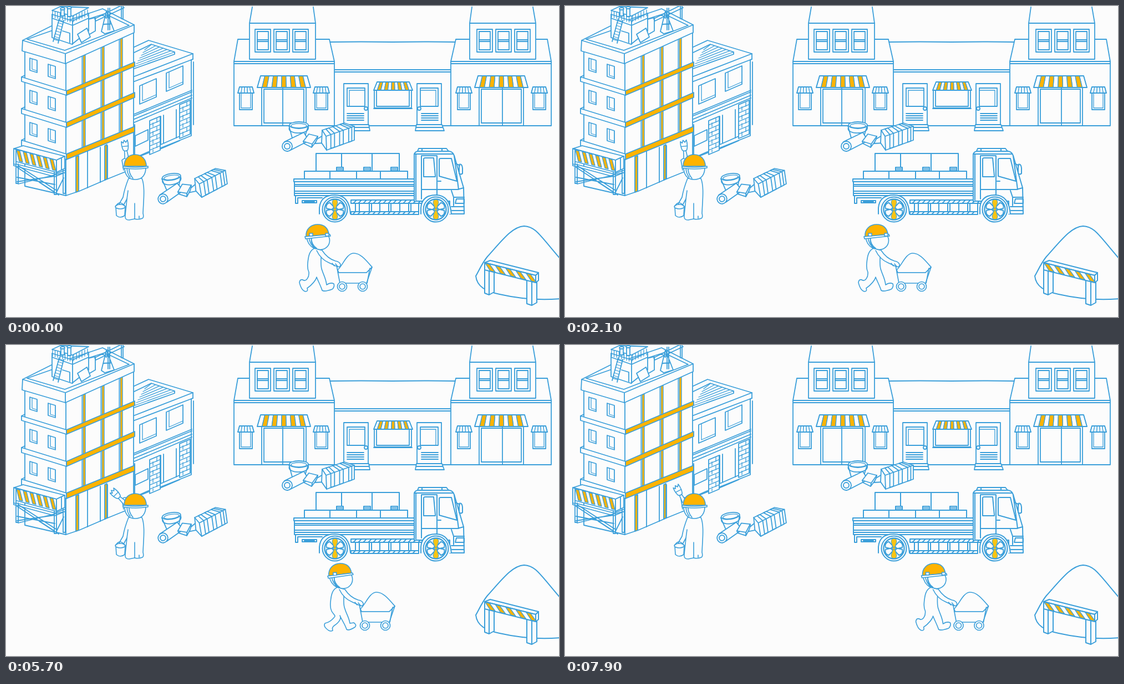
Write an HTML page that moves like this. It is 997 px wide and 561 px high and loops after 8000 ms.

```html
<!DOCTYPE html>
<html lang="en">
<head>
<meta charset="utf-8">
<title>Building site</title>
<style>
html, body { margin: 0; width: 100%; height: 100%; overflow: hidden; background: #fcfcfc; }
svg { display: block; width: 997px; height: 561px; }
svg * { vector-effect: non-scaling-stroke; }
#stage { fill: #fcfcfc; stroke: #3b9fda; stroke-width: 1.8; stroke-linejoin: round; stroke-linecap: round; }
#walker, #painter { stroke-width: 1.6; }
#truck, #sand { stroke-width: 2; }
.n { fill: none; }
.o { fill: #ffb300; }
.y { fill: #f8c414; stroke-width: 1; }
.b { stroke-width: 2.3; }
.t { stroke-width: 1.3; }
</style>
</head>
<body>
<svg viewBox="0 0 997 561"><g id="stage"></g></svg>
<script>
const path = (d, cls = '') => `<path class="${cls}" d="${d}"/>`;
const rect = (x, y, x2, y2, cls = '') => path(`M${x} ${y}H${x2}V${y2}H${x}Z`, cls);
const disc = (x, y, r, cls = '') => `<circle cx="${x}" cy="${y}" r="${r}" class="${cls}"/>`;
const oval = (x, y, rx, ry, cls = '') => `<ellipse cx="${x}" cy="${y}" rx="${rx}" ry="${ry}" class="${cls}"/>`;
const group = (body, transform = '', id = '') =>
  `<g${id && ` id="${id}"`}${transform && ` transform="${transform}"`}>${body}</g>`;
const repeat = (n, f) => Array.from({ length: n }, (_, i) => f(i)).join('');
const mix = (a, b, k) => a + (b - a) * k;

// Slanted four-sided panel: vertical edges at x and x2
const slant = (x, y, x2, y2, h, cls) => path(`M${x} ${y}L${x2} ${y2}v${h}L${x} ${y + h}Z`, cls);

function tower() {
  const bands = [[153, 101, 8], [210, 156, 9], [267, 217, 10]];
  const columns = [139, 173, 206].map(x => {
    const top = 104 - .455 * (x - 108), end = 267 - .4 * (x - 108);
    return path(`M${x - 2} ${top}V${end}`, 'n t') + slant(x, top, x + 4, top - 2, end - top, 'o t');
  }).join('');
  const floors = bands.map(([y, y2, h], i) =>
    slant(43, 94 + 58 * i, 56, 98 + 58 * i, 22) + path(`M47 ${96 + 58 * i}v18l9 3`, 'n t') +
    slant(76, 105 + 58 * i, 89, 109 + 58 * i, 22) + path(`M80 ${107 + 58 * i}v18l9 3`, 'n t') +
    slant(28, y - 25, 109, y, h) + path(`M28 ${y - 25}l6 -3`, 'n') +
    slant(109, y, 232, y2, h, 'o')).join('');
  return path('M34 80V325L108 342L132 334L183 312L230 293V40L108 95Z') +
    path('M108 95V342M183 252V312M147 262V328M170 255V318', 'n') +
    columns + floors +
    slant(126, 272, 131, 270, 64, 'o') + slant(178, 252, 182, 250, 62, 'o') +
    path('M30 62L82 36L174 5L231 34V48L107 104L29 81Z') +
    path('M30 62L107 86L231 34M107 86V104M38 60L106 80L222 35L178 14L84 44Z', 'n');
}

function rooftop() {
  return path('M83 15L120 27L149 13V45L119 69L83 57Z') +
    path('M120 27V69M83 22L120 35L149 22M102 45L115 49V66M149 24L161 21V45L149 52', 'n') +
    path('M83 8L98 1L149 3L120 18Z', 'n') +
    repeat(9, i => path(`M${84 + 4.5 * i} ${8 + 1.3 * i}v12`, 'n t')) +
    repeat(6, i => path(`M${122 + 5 * i} ${17 - 2 * i}v11`, 'n t')) +
    rect(99, 5, 105, 18) + rect(111, 2, 117, 19) + oval(102, 5, 4, 2) + oval(114, 3, 4, 2) +
    path('M85 64L96 23M94 67L104 26', 'n') +
    repeat(8, i => path(`M${86 + 1.3 * i} ${60 - 5 * i}l9 3`, 'n t')) +
    path('M129 51L146 40L152 56L136 66Z') +
    path('M172 46L181 9L195 45M176 33L190 32M172 46L178 50L195 45M184 4V43M187 4V43M160 23L206 0M162 27L213 3M160 23L162 27M174 16L181 22L188 13', 'n') +
    path('M208 0V23M211 0V24', 'n');
}

function annex() {
  const bricks = (x, y) => slant(x, y, x + 19, y - 8, 61) + repeat(8, i =>
    path(`M${x} ${y + 7.6 * i}l19 -8M${x + (i % 2 ? 6 : 13)} ${y + 7.6 * i - 4}v7`, 'n t'));
  return path('M229 75L257 62L337 86V96L334 97V234L229 276Z') +
    path('M229 128L337 86M229 137L337 96', 'n') +
    repeat(7, i => path(`M${232 + 3 * i} ${109 - 5 * i}L${304 - 7 * i} ${83 - 2.2 * i}`, 'n t')) +
    path('M231 113L304 87V83L262 69L231 84', 'n') +
    slant(241, 144, 271, 131, 33) + path('M246 142V171L271 160', 'n t') +
    slant(289, 121, 319, 108, 33) + path('M294 119V148L319 137', 'n t') +
    path('M229 196L335 152M229 199L335 155M229 205L335 161M229 211L335 166M232 214V270', 'n') +
    slant(233, 234, 256, 223, 19) +
    path('M279 199V250L313 235M284 197V247M307 187V238M232 274L259 262M278 258L313 243', 'n') +
    bricks(259, 207) + bricks(313, 178) + path('M338 101V214', 'n');
}

function scaffold() {
  return path('M18 284V320H22V285M87 300V340H91V300M103 296V338H107V293M14 284L88 303L107 296V300L88 308L14 288Z') +
    path('M20 291L88 336M22 288L90 332M20 317L87 307M22 321L103 301M91 336L104 310M20 309L88 322M60 318L95 341', 'n') +
    path('M15 257L31 252L106 271L91 278Z') +
    slant(16, 258, 91, 278, 22) +
    repeat(6, i => path(`M${19 + 12 * i} ${260 + 3.1 * i}l6 1.6l5 20l-6 -1.6Z`, 'o t')) +
    path('M91 278L106 271V293L91 300ZM100 274V296M14 257V285L18 286V259Z');
}

function awning(x, x2, y, bottom, inset, n, tinted) {
  const at = (k, pad) => mix(x + pad, x2 - pad, k);
  return repeat(n, i => {
    const a = i / n, b = (i + 1) / n;
    return path(`M${at(a, inset)} ${y}H${at(b, inset)}L${at(b, 0)} ${bottom}H${at(a, 0)}Z`, tinted && i % 2 ? 'o t' : 't');
  }) + path(`M${x + inset} ${y}H${x2 - inset}L${x2} ${bottom}H${x}Z`, 'n');
}

function halfStreet() {
  const sash = x => rect(x, 42, x + 28, 83) + rect(x + 4, 46, x + 24, 79) +
    path(`M${x + 4} 61h20M${x + 4} 64h20`, 'n');
  const sideWindow = x => rect(x + 3, 157, x + 26, 187) + rect(x + 6, 157, x + 23, 184, 't') +
    awning(x, x + 29, 146, 157, 3, 5);
  return path('M583 65Q640 64 697 65M592 115H697M592 119H697M592 216H697', 'n') +
    path('M418 60H583L592 100V216H411V100Z') + path('M411 100H592M411 104H592', 'n') +
    path('M444 2L439 31V96H558V31L554 2') + path('M440 31H558', 'n') +
    sash(449) + sash(483) + sash(517) +
    rect(461, 147, 541, 216) + path('M465 211V150H537V211M499 147V216M465 211H537', 'n') +
    awning(453, 549, 126, 147, 6, 11, true) + sideWindow(418) + sideWindow(554) +
    rect(609, 140, 653, 214) + rect(615, 148, 647, 181) + path('M619 181V152H647', 'n t') +
    disc(649, 185, 3) +
    repeat(4, i => path(`M615 ${194 + 4 * i}H645`, 'n')) +
    path('M608 214H654L656 225H604Z') + path('M607 219H655', 'n');
}

function street() {
  return group(halfStreet()) + group(halfStreet(), 'matrix(-1 0 0 1 1394 0)') +
    rect(664, 150, 731, 184) + path('M668 152V181H727V152M663 185H732', 'n') +
    awning(663, 733, 137, 152, 6, 11, true);
}

function supplies() {
  const strap = (k, k2) => path([k, k2].map((q, i) =>
    `${i ? 'L' : 'M'}${mix(571, 590, i)} ${mix(0, 0, i)}`).length &&
    `M${mix(570, 590, 0) + 40 * k} ${224 - 13 * k}L${577 + 51 * k} ${235 - 18 * k}V${260 - 18 * k}` +
    `L${577 + 51 * k2} ${260 - 18 * k2}V${235 - 18 * k2}L${570 + 40 * k2} ${224 - 13 * k2}Z`);
  return path('M510 216L516 238Q526 246 538 238L545 216') + oval(528, 215, 17, 6) + oval(528, 216, 14, 4, 't') +
    path('M511 219C508 226 519 230 530 229S546 224 545 218', 'n') +
    path('M502 245L537 228L546 243L513 260Z') + disc(507, 253, 9) + disc(507, 253, 5) +
    path('M536 244L546 231L562 235L552 249Z') + path('M536 244L537 248L551 255L552 249M562 235L561 242L551 255', 'n') +
    path('M561 240L574 232L575 247L557 248Z') +
    path('M570 224L610 211L628 217V242L578 260L569 247Z') +
    strap(.17, .3) + strap(.48, .61) + strap(.8, .91) +
    path('M570 224L577 235L628 217M577 235L578 260', 'n');
}

function wheel(x) {
  const spoke = a => group(path('M-3 -4L-6 -14Q0 -20 6 -14L3 -4Z', 'n'), `rotate(${a})`);
  const petal = path('M-1.5 -1L-5 -12Q-5 -18 0 -18Q5 -18 5 -12L1.5 -1Z', 'y');
  return group(disc(0, 0, 22.5) + disc(0, 0, 18.5, 'b') +
    [60, 120, 240, 300].map(spoke).join('') +
    petal + group(petal, 'rotate(180)') + disc(0, 0, 2.5, 'y'), `translate(${x} 367)`);
}

function truck() {
  const row = (xs, y, y2) => xs.slice(1).map((x, i) => rect(xs[i], y, x, y2)).join('');
  return row([559, 605, 660, 709], 266, 298) + row([538, 584, 632, 675, 724], 298, 312) +
    [596, 645, 694].map(x => rect(x, 291, x + 12, 297) + path(`M${x + 2} 294h8`, 'n')).join('') +
    rect(519, 312, 737, 317) + rect(520, 317, 737, 342) +
    path('M520 322H737M520 325H737M520 334H737M520 338H737', 'n') +
    path('M522 342V356H526V346H570M534 351H560V355H534ZM538 353H556', 'n') +
    path('M565 375V364Q567 341 593 341Q619 341 621 375') +
    rect(622, 350, 750, 356) + repeat(14, i => path(`M${626 + 9 * i} 356l6 -6`, 'n')) +
    rect(630, 356, 744, 371) +
    [637, 655, 659, 674, 690, 694, 710, 726, 730].map(x => path(`M${x} 356V371`, 'n')).join('') +
    rect(622, 371, 744, 376) + repeat(13, i => path(`M${625 + 9 * i} 376l5 -5`, 'n')) +
    path('M736 353V268Q737 262 744 262H799Q806 263 808 270L825 328L826 375H800V352H740Z') +
    path('M742 262L744 257H794L798 262ZM750 257V262M786 257V262') +
    path('M736 267H806M739 268V350M749 270V348M777 270V345M749 331H814L825 328M749 270H777M808 270L812 300L816 331', 'n') +
    path('M753 276Q753 274 756 274H771L774 306V308H753Z') +
    path('M781 277Q781 275 784 275H803L813 316L781 307Z') +
    path('M779 316h5M803 333L807 345H826M807 346V360M812 348H826V356H810ZM803 362H826M804 369H826', 'n') +
    path('M817 286Q822 284 823 292V302Q820 305 817 302ZM811 284L818 288') +
    path('M748 375V364Q750 341 775 341Q800 341 803 375') +
    wheel(593) + wheel(775);
}

function painter() {
  const brush = group(path('M-3 21L-2 5H2L4 21') + path('M-4 6Q-7 -1 -6 -10L-3 -7L-1 -12L2 -8L5 -12Q7 -2 4 6Q0 9 -4 6Z') +
    path('M-5 -1H5', 'n t'), '', 'brush');
  return path('M212 296L209 278Q215 272 219 278L226 294') + brush +
    path('M221 311C217 321 213 333 211 345L204 357L211 361L218 348C217 360 215 374 215 379Q214 386 222 386L232 384Q238 386 246 383Q249 381 247 374C248 350 251 325 245 311Z') +
    path('M218 348L220 333M232 384V356M240 383V379', 'n') +
    path('M198 362L199 378Q206 384 214 378L215 362Z') + oval(206, 362, 9, 4) + path('M198 361Q205 349 214 361', 'n') +
    path('M214 288C213 304 220 313 233 313S253 304 252 288Z') +
    path('M218 291Q218 302 224 309M222 291Q221 302 229 311', 'n') +
    path('M213 289C213 276 221 268 233 268S253 277 253 289Z', 'o') + path('M211 289Q233 293 256 289V292Q233 296 211 292Z');
}

function cart() {
  return path('M598 476C607 468 614 447 626 446C638 445 648 457 660 471L650 481H600Z') +
    path('M590 461L596 468L602 500H650L660 471L650 481H598') + path('M656 473L651 500', 'n') +
    disc(606, 506, 8.5) + disc(606, 506, 5) + disc(643, 506, 8.5) + disc(643, 506, 5);
}

// The legs continue the outline of the back down to the hip
function pusher(legs, tilt, ears) {
  const head = disc(567, 423, 16.5) + path('M542 416Q543 430 555 437M546 416Q547 430 558 438M550 416Q550 430 560 437', 'n') +
    path('M541 416C540 402 550 394 562 394S581 401 582 412Z', 'o') +
    path('M539 416L584 412L585 415L540 420Z') +
    ears.map(x => rect(x, 410, x + 6, 415)).join('');
  return path(`M557 437C547 440 545 452 544 464Q543 474 546 480${legs}C567 470 568 462 568 454L570 441Z`) +
    path('M560 441C565 452 574 460 582 463L597 470Q604 472 603 466Q601 461 594 460C584 457 576 450 570 441') +
    path('M588 464L592 469M594 465L598 470', 'n') +
    group(head, `rotate(${tilt} 562 418)`);
}

function sand() {
  return path('M1000 457C962 413 955 398 934 397C913 398 895 422 868 452C858 464 852 479 847 487C849 506 865 515 890 520C925 528 965 531 1000 528') +
    path('M863 474V518L871 521L880 516V478ZM871 479V521') + path('M939 492V537L948 540L957 535V494ZM948 496V540') +
    path('M863 463L873 459L960 481L955 486Z') + path('M955 486L960 481V495L955 499Z') + slant(863, 463, 955, 486, 13) +
    repeat(5, i => path(`M${864 + 18.5 * i} ${464 + 4.6 * i}l8 2l10 14l-9 -2.2Z`, 'o t'));
}

const strideWide = 'C547 490 541 496 537 495Q530 491 529 499C531 507 534 514 540 515Q545 515 543 509C552 503 559 494 560 489C563 497 568 506 570 513Q574 516 588 511Q593 507 591 501Q585 498 578 503C577 492 572 484 570 477';
const strideNarrow = 'C549 486 555 488 550 492C545 498 539 501 534 502Q531 507 537 512Q543 518 548 515Q546 509 551 506C560 500 564 493 561 488C564 496 570 503 573 513Q577 516 588 509Q592 505 586 501L579 502C577 490 572 484 570 476';

const byId = id => document.getElementById(id);
byId('stage').innerHTML = annex() + tower() + rooftop() + scaffold() + street() +
  supplies() + group(supplies(), 'translate(283 348) rotate(-8) scale(.98) translate(-507 -253)') +
  group(sand(), '', 'sand') + group(painter(), '', 'painter') + group(truck(), '', 'truck') +
  group(cart() + group(pusher(strideWide, 0, [547, 576]), '', 'wide') +
    group(pusher(strideNarrow, -2, [549]), '', 'narrow'), '', 'walker');

const brushPoses = ['translate(205 264) rotate(-27)', 'translate(199 270) rotate(-45)', 'translate(215 254) rotate(-6)'];

function truckShift(t) {
  if (t < 500 || t >= 2100) return 0;
  if (t < 1620) return 7.2 * (1 + Math.floor((t - 500) / 240));
  return [43, 29, 14][Math.floor((t - 1620) / 160)];
}

function walkerShift(step) {
  if (step < 0) return 0;
  return step < 4 ? 4 + 3.57 * step : 24 + 5.68 * (step - 5);
}

function draw() {
  const t = performance.now() % 8000;
  const step = t < 4100 ? -1 : Math.floor((t - 4100) / 200);
  const wide = step % 2 !== 0;
  byId('truck').setAttribute('transform', `translate(${truckShift(t)})`);
  byId('walker').setAttribute('transform', `translate(${walkerShift(step)})`);
  byId('wide').style.display = wide ? '' : 'none';
  byId('narrow').style.display = wide ? 'none' : '';
  byId('brush').setAttribute('transform', brushPoses[Math.floor((step + 6) % 6 / 2)]);
  requestAnimationFrame(draw);
}
draw();
</script>
</body>
</html>
```
